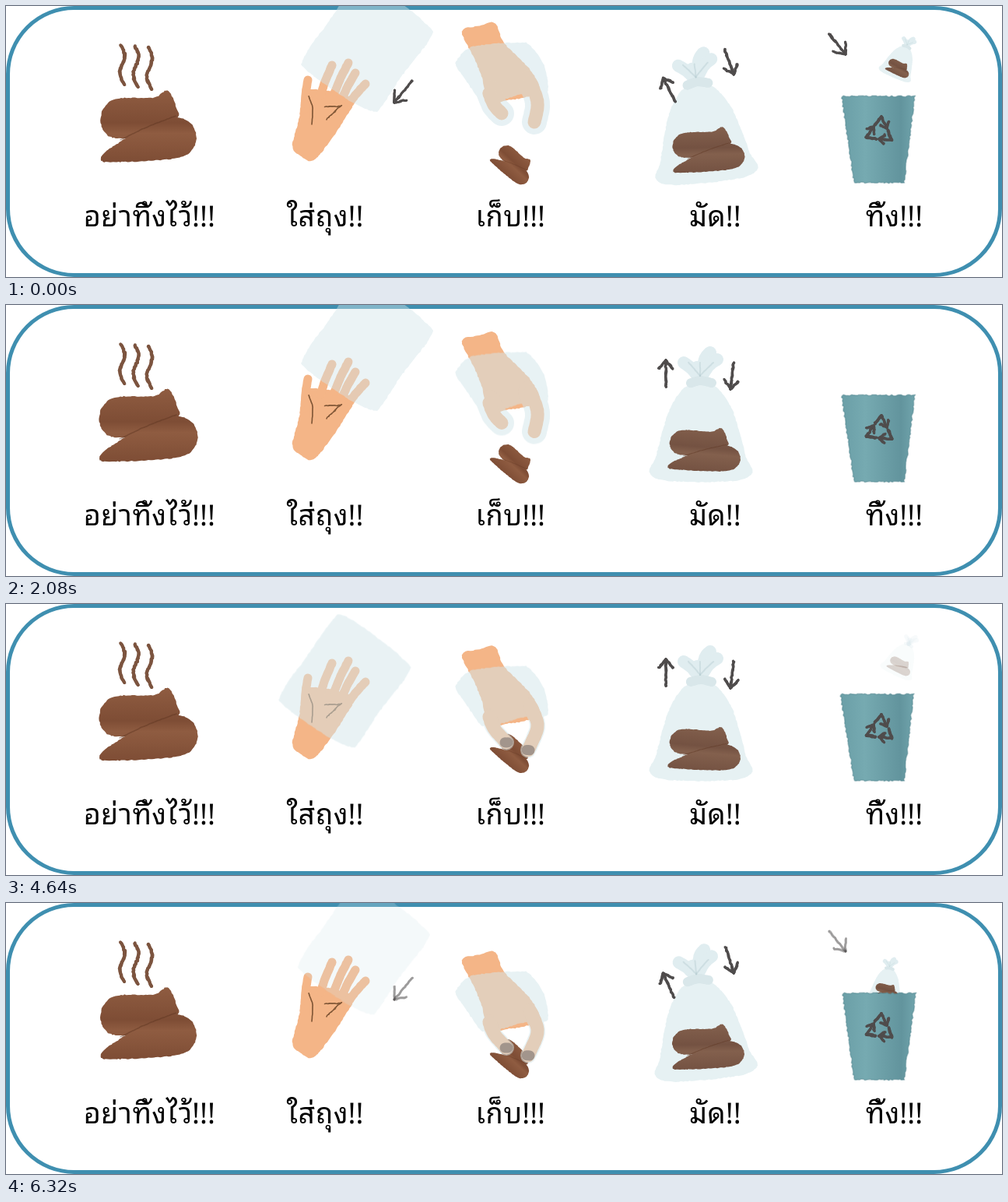
Write an HTML page with a canvas that moves like this. It is 1280 px wide and 348 px high and loops after 6.4 s.

```html
<!DOCTYPE html>
<html lang="th">
<head>
<meta charset="utf-8">
<title>Clean up steps</title>
<style>
html, body { margin: 0; width: 1280px; height: 348px; overflow: hidden; background: #fff; }
canvas, svg { position: absolute; left: 0; top: 0; display: block; }
text { font: 300 37px "Noto Sans Thai Looped", "Noto Looped Thai", "Noto Sans Thai", "Noto Sans", sans-serif; text-anchor: middle; fill: #000; }
</style>
</head>
<body>
<canvas id="c" width="1280" height="348"></canvas>
<svg width="1280" height="348">
  <text x="184.5" y="283">อย่าทิ้งไว้!!!</text>
  <text x="410" y="283">ใส่ถุง!!</text>
  <text x="648.5" y="283">เก็บ!!!</text>
  <text x="911" y="283">มัด!!</text>
  <text x="1141" y="283">ทิ้ง!!!</text>
</svg>
<script>
const LOOP = 6400, STEP = 80;
const SKIN = '#f4b587', FILM = '#d3e6ea', INK = '#4f4c4c', BROWN = '#7c543f';
const main = document.getElementById('c').getContext('2d');
const veil = new OffscreenCanvas(1280, 348).getContext('2d');
let g = main;

let seed = 7;
const rnd = () => (seed = (seed * 16807) % 2147483647) / 2147483647 - 0.5;
const span = (p, a, b) => Math.max(0, Math.min(1, (p - a) / (b - a)));
const smooth = (p, a, b) => { const u = span(p, a, b); return u * u * (3 - 2 * u); };
// bell around every multiple of the period
const bell = (t, period, width) => {
  const p = t % period, d = Math.min(p, period - p, width);
  return (1 + Math.cos(Math.PI * d / width)) / 2;
};

// rough path through points: bend 1 is a smooth curve, bend 0 straight edges
function trace(pts, { bend = 1, rough = 1.1, closed = true } = {}) {
  const n = pts.length, path = new Path2D();
  const at = i => pts[closed ? (i + n) % n : Math.max(0, Math.min(n - 1, i))];
  for (let i = 0; i < (closed ? n : n - 1); i++) {
    const [a, b, c, d] = [at(i - 1), at(i), at(i + 1), at(i + 2)];
    const steps = Math.max(2, Math.round(Math.hypot(c[0] - b[0], c[1] - b[1]) / 2.5));
    for (let j = 0; j < steps; j++) {
      const u = j / steps;
      path.lineTo(...[0, 1].map(k => {
        const flat = b[k] + (c[k] - b[k]) * u;
        const curve = b[k] + u / 2 * (c[k] - a[k] + u * (2 * a[k] - 5 * b[k] + 4 * c[k] - d[k] + u * (3 * (b[k] - c[k]) + d[k] - a[k])));
        return flat + (curve - flat) * bend + rnd() * rough;
      }));
    }
  }
  if (closed) path.closePath();
  else path.lineTo(...at(n - 1));
  return path;
}

function fill(path, color) { g.fillStyle = color; g.fill(path); }
function line(path, color, w) { g.strokeStyle = color; g.lineWidth = w; g.stroke(path); }

function limb(pts, color, w) { line(trace(pts, { closed: false, rough: 0.4 }), color, w); }

function chalk(pts, color, w) {
  for (let i = 0; i < 2; i++) line(trace(pts, { closed: false, rough: 1.6 }), color, w * 0.8);
}

function place(x, y, deg, sx, sy, px, py, draw) {
  g.save();
  g.translate(x, y);
  g.rotate(deg * Math.PI / 180);
  g.scale(sx, sy);
  g.translate(-px, -py);
  draw();
  g.restore();
}

// translucent plastic: overlapping parts blend as one layer
function plastic(alpha, draw) {
  g = veil;
  g.clearRect(0, 0, 1280, 348);
  g.lineCap = g.lineJoin = 'round';
  draw();
  g = main;
  g.save();
  g.globalAlpha = alpha * 0.52;
  g.drawImage(veil.canvas, 0, 0);
  g.restore();
}

function arrow(x1, y1, x2, y2, head = 14, w = 3.6) {
  const back = Math.atan2(y1 - y2, x1 - x2);
  chalk([[x1, y1], [x2, y2]], INK, w);
  for (const a of [back - 0.68, back + 0.68])
    chalk([[x2 + head * Math.cos(a), y2 + head * Math.sin(a)], [x2, y2]], INK, w);
}

const lower = trace([[121, 199], [128, 186], [175, 158], [215, 142], [241, 153], [246, 175], [230, 193], [190, 199], [140, 201]]);
const upper = trace([[120, 150], [125, 129], [143, 118], [190, 117], [208, 108], [220, 130], [218, 146], [165, 168], [132, 168]]);
const seam = trace([[146, 172], [182, 155], [219, 141]], { closed: false, rough: 0.5 });

function poop(light = '#8f5c41', dark = '#7e4d35') {
  const c = g.createLinearGradient(0, 108, 0, 201);
  c.addColorStop(0, light);
  c.addColorStop(0.45, dark);
  c.addColorStop(0.6, light);
  c.addColorStop(1, dark);
  fill(upper, c);
  fill(lower, c);
  line(seam, 'rgba(92,52,32,.45)', 1.6);
}

const halfBag = [[17, 104], [38, 130], [50, 165], [58, 195], [66, 215], [42, 226]];
const body = trace([...halfBag.map(([w, y]) => [893 + w, y]), ...halfBag.map(([w, y]) => [893 - w, y]).reverse()]);

function bag() {
  fill(body, '#e6f1f3');
  place(851, 209, 5, 0.73, 0.62, 121, 199, () => poop('#83604d', '#745242'));
  for (const [x, y] of [[871, 74], [888, 80], [905, 61], [914, 70]])
    limb([[892, 95], [(892 + x) / 2, y + 8], [x, y]], '#e0edf0', 16);
  limb([[880, 100], [893, 97], [907, 100]], '#d9e7ea', 12);
  for (const x of [877, 892, 909])
    limb([[x, 74], [(x + 892) / 2, 82], [892, 91]], 'rgba(178,200,206,.4)', 2);
}

function border() {
  g.strokeStyle = '#3f8fb0';
  g.lineWidth = 5;
  g.beginPath();
  g.roundRect(2.5, 2.5, 1275, 343, 85);
  g.stroke();
}

function steamingPile(t) {
  const s = 1 - 0.028 * bell(t, 1280, 400);
  place(184, 160, 0, s, (1 + s) / 2, 184, 160, () => poop());
  const sway = bell(t + 1000, 1200, 150);
  for (let i = 0; i < 3; i++) {
    const pts = [];
    for (let u = 0; u <= 1; u += 0.125)
      pts.push([148 + 17.5 * i + 3 * u + 4 * Math.sin(u * 6.6 - sway * 0.5), 51 + i + u * (50 + 2 * i)]);
    chalk(pts, BROWN, 5);
  }
}

const palm = trace([[383, 112], [405, 108], [445, 119], [436, 144], [398, 196], [378, 192], [368, 180], [376, 148]]);
const sheet = trace([[342, 137], [378, 81], [418, 27], [452, 44], [512, 95], [470, 154], [440, 198], [403, 183]], { bend: 0.4 });

function coverHand(t) {
  fill(palm, SKIN);
  const fingers = [[384, 132, 388, 95], [404, 116, 419, 76], [422, 112, 440, 73], [433, 117, 449, 86], [441, 125, 462, 100]];
  for (const [x1, y1, x2, y2] of fingers)
    limb([[x1, y1], [(x1 + x2) / 2 - 1, (y1 + y2) / 2], [x2, y2]], SKIN, 11);
  limb([[389, 116], [394, 131], [393, 152]], '#7d5434', 1.6);
  chalk([[410, 129], [429, 129], [429, 129], [412, 146]], '#7d5434', 1.4);

  const p = t % 2160, entering = p > 1700;
  const away = entering ? span(p, 1400, 2080) : 1 - smooth(p, 0, 460);
  const alpha = entering ? span(p, 1900, 2080) : 1 - span(p, 1420, 1680);
  g.save();
  g.translate(37 * away, -62 * away);
  plastic(alpha * (1 - 0.15 * away), () => fill(sheet, FILM));
  g.restore();
}

function hints(t) {
  const p = (t + 160) % 1280, k = span(p, 160, 480) * 2;
  g.globalAlpha = span(p, 40, 160) * (1 - span(p, 400, 560));
  place(-8 * k, 12 * k, 0, 1, 1, 0, 0, () => arrow(522, 96, 499, 124, 16));
  place(3 * k, 4 * k, 0, 1, 1, 0, 0, () => arrow(1058, 36, 1079, 62, 16));
  g.globalAlpha = 1;
}

const fist = trace([[586, 33], [606, 26], [628, 22], [640, 47], [672, 80], [686, 108], [664, 118], [642, 121], [622, 126], [611, 90], [601, 66]]);
const glove = trace([[577, 73], [598, 52], [668, 47], [692, 76], [696, 110], [662, 113], [640, 120], [612, 124], [590, 94]], { bend: 0.5 });

function pickUp(t) {
  const p = t % 1920;
  const raise = 15 * span(p, 440, 880);
  const dip = (45 * smooth(p, 0, 440) - raise) * (1 - smooth(p, 960, 1300));
  const pinch = smooth(p, 240, 440) * (1 - smooth(p, 960, 1160));
  place(622, 198 - raise * (1 - smooth(p, 1440, 1600)), 43, 0.43, 0.39, 121, 199, () => poop());

  const tips = [[637 + 6 * pinch, 138 + 7 * pinch], [679 - 8 * pinch, 149 + 6 * pinch]];
  const fingers = [[[621, 112], [627, 127], tips[0]], [[674, 98], [683, 124], tips[1]]];
  g.save();
  g.translate(0, dip);
  fill(fist, SKIN);
  for (const f of fingers) limb(f, SKIN, 17);
  plastic(1, () => {
    fill(glove, FILM);
    for (const f of fingers) limb(f, FILM, 32 - 12 * pinch);
  });
  for (const [x, y] of tips)
    limb([[x - 2, y], [x + 2, y]], `rgba(140,130,124,${0.75 * pinch})`, 13);
  g.restore();
}

function tieBag(t) {
  const b = bell(t, 1280, 385);
  place(893, 143, -6 * b, 1, 1, 893, 143, bag);
  place(891, 89, -27 * b, 1, 1, 891, 89, () => {
    arrow(848, 105, 848, 71, 14, 4);
    arrow(935, 74, 931, 108, 14, 4);
  });
}

const bin = trace([[1074, 116], [1168, 116], [1154, 227], [1090, 227]], { bend: 0, rough: 1.8 });

function dropBag(t) {
  const p = (t + 160) % 1200, falling = p < 720;
  if (falling) {
    const q = Math.max(0, (p - 120) / 520);
    g.globalAlpha = span(p, -40, 120);
    place(1142 - 20 * q, 91 + 73 * q * q, 25 - 22 * q, 0.335, 0.335, 893, 226, bag);
    g.globalAlpha = 1;
  }
  const lean = falling ? 1.7 * Math.sin(Math.PI * (p - 160) / 430) : 0;
  g.save();
  g.transform(1, 0, -lean / 111, 1, lean * 227 / 111, 0);
  const c = g.createLinearGradient(1078, 0, 1166, 0);
  c.addColorStop(0, '#6ca0a8');
  c.addColorStop(0.3, '#76aab1');
  c.addColorStop(0.82, '#62949d');
  c.addColorStop(1, '#6fa3ab');
  fill(bin, c);
  line(bin, 'rgba(82,133,143,.45)', 1.6);
  g.restore();
  for (let i = 0; i < 3; i++)
    place(1123, 161, i * 120, 1, 1, 0, 0, () => {
      chalk([[-6, -9], [2, -19]], INK, 4.5);
      arrow(2, -19, 9, -4, 9, 4);
    });
}

function draw(now) {
  const t = Math.floor((now % LOOP) / STEP) * STEP;
  seed = 31;
  g.fillStyle = '#fff';
  g.fillRect(0, 0, 1280, 348);
  g.lineCap = g.lineJoin = 'round';
  border();
  steamingPile(t);
  coverHand(t);
  pickUp(t);
  tieBag(t);
  dropBag(t);
  hints(t);
}

const start = performance.now();
function tick() {
  draw(performance.now() - start);
  requestAnimationFrame(tick);
}
tick();
</script>
</body>
</html>
```
